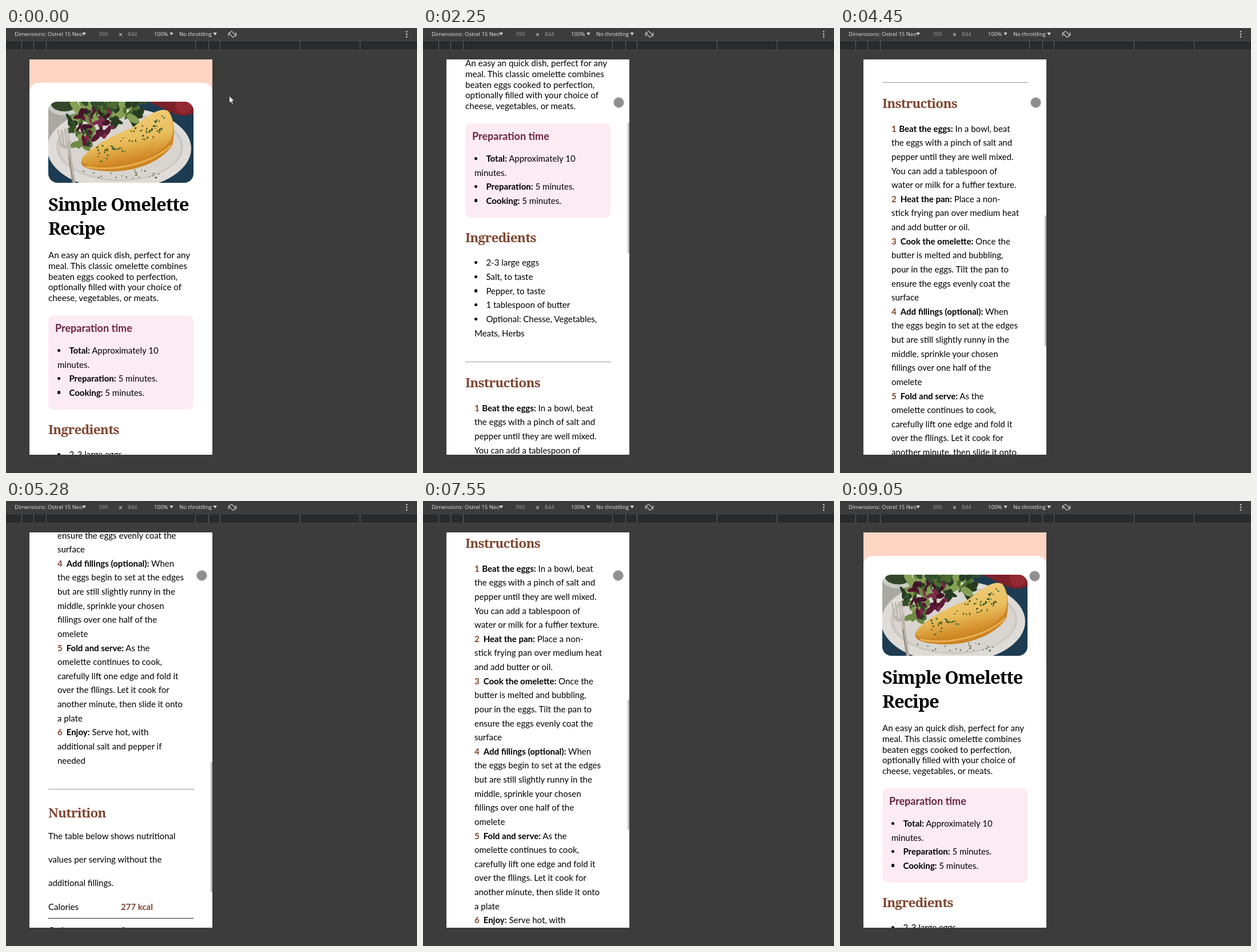
An HTML page for the animation above (9.65 s loop, 719 by 779 pixels).

```html
<!DOCTYPE html>
<html lang="en">
<head>
<meta charset="utf-8">
<title>Recipe page preview</title>
<style>
  html, body { margin: 0; width: 100%; height: 100%; overflow: hidden; background: #3c3c3c; }
  #stage { position: relative; width: 719px; height: 779px; overflow: hidden; background: #3c3c3c; }
  #stage > *, .page > * { position: absolute; margin: 0; padding: 0; white-space: nowrap; }

  .tool { font: 9.6px/14px "Open Sans", "Noto Sans", sans-serif; color: #e6e6e6; top: 4px; }
  .dim { color: #9b9b9b; }
  .ruler { left: 0; top: 22px; width: 719px; height: 15px; background: #292a2b; border: solid #474747; border-width: 1px 0; box-sizing: content-box; }
  .ruler i { position: absolute; top: 0; width: 1px; height: 15px; background: #646464; }

  #view { left: 41px; top: 55px; width: 320px; height: 692px; overflow: hidden; background: #fff; }
  .page { position: absolute; left: 0; top: 0; width: 320px; height: 2088px; background: #ffd5c4;
    font: 15px/24.62px Lato, sans-serif; color: #000; }
  .card { left: 0; top: 41px; width: 320px; height: 2006px; border-radius: 16px; background: #fff; }
  .photo { left: 33px; top: 73.5px; width: 254px; height: 142.5px; border-radius: 16px; overflow: hidden; }
  h1, h2 { left: 33px; font-family: "Noto Serif", serif; font-weight: 600; letter-spacing: -.032em; }
  h1 { top: 232px; font-size: 31px; line-height: 42px; }
  h2 { font-size: 22.5px; line-height: 30px; color: #7f4530; }
  h3 { left: 45px; top: 458px; font-size: 18px; line-height: 24px; color: #6c2447; }
  .intro { left: 33px; top: 332.7px; font-size: 15.2px; line-height: 18.9px; }
  .prep { left: 33px; top: 448px; width: 254px; height: 164.5px; border-radius: 9px; background: #fdebf3; }
  .list { left: 49px; }
  .list u { display: inline-block; width: 5.4px; height: 5.4px; margin-right: 15px; border-radius: 50%; background: #000; vertical-align: 3px; }
  .list s { margin-right: 7px; text-decoration: none; font-weight: 700; color: #7f4530; }
  .list s:first-child { margin-right: 4.5px; }
  .rule { left: 33px; width: 255px; height: 1px; background: #989898; }
  .note { left: 33px; top: 1723.2px; line-height: 41px; }
  .facts { left: 33px; top: 1846.6px; width: 254px; }
  .facts div { height: 40.8px; line-height: 40px; border-bottom: 1px solid #222; }
  .facts b { position: absolute; left: 127px; color: #7f4530; }

  #bar { position: absolute; right: 0; top: 0; width: 3px; height: 228px; background: #bdbdbd; }
  #touch { left: -10px; top: -10px; width: 17px; height: 17px; border: 1.5px solid #c4c4c4; border-radius: 50%; background: #8f8f8f; }
  #arrow { left: 0; top: 0; }
</style>
</head>
<body>
<div id="stage">
  <span class="tool" style="left:15px">Dimensions: Ostrel 15 Neo</span>
  <span class="tool dim" style="left:162px">390</span>
  <span class="tool" style="left:197px;top:5px;font-size:12px">×</span>
  <span class="tool dim" style="left:213px">844</span>
  <span class="tool" style="left:259px">100%</span>
  <span class="tool" style="left:303px">No throttling</span>
  <svg style="left:0;top:0" width="719" height="22" fill="#d8d8d8">
    <path d="M133.500 8h6.500l-3.250 5zM286.500 8h6l-3 5zM362.500 8h6.500l-3.250 5z"/>
    <g transform="rotate(-45 396 11)" fill="none" stroke="#cfcfcf" stroke-width="1.2">
      <rect x="391" y="8" width="10" height="6" rx="1" transform="rotate(90 396 11)"/>
      <path d="M389.500 9a6.800 6.800 0 0 1 5-4.500M402.500 13a6.800 6.800 0 0 1-5 4.500"/>
    </g>
    <circle cx="701" cy="6.500" r="1.300"/><circle cx="701" cy="11" r="1.300"/><circle cx="701" cy="15.500" r="1.300"/>
  </svg>
  <div class="ruler" id="ruler"></div>

  <div id="view">
    <div class="page" id="page">
      <div class="card"></div>
      <div class="photo">
        <svg width="254" height="143" viewBox="0 0 254 143">
          <defs>
            <linearGradient id="egg" x1="0" y1="0" x2=".35" y2="1">
              <stop offset="0" stop-color="#f3d588"/><stop offset=".65" stop-color="#e9bd5c"/><stop offset="1" stop-color="#cf8420"/>
            </linearGradient>
          </defs>
          <rect width="254" height="143" fill="#1d3c52"/>
          <path d="M0 0h75L0 85z" fill="#a9a8a3"/>
          <ellipse cx="28" cy="7" rx="29" ry="17" fill="#c9cbc4"/>
          <ellipse cx="28" cy="4" rx="23" ry="13" fill="#33462a"/>
          <path d="M175 0h79v20q-20 10-42-3z" fill="#7d2029"/>
          <circle cx="237" cy="6" r="15" fill="#932932"/>
          <ellipse cx="124" cy="82" rx="126" ry="72" fill="#dfdcd8"/>
          <ellipse cx="125" cy="79" rx="111" ry="60" fill="#cbc7c2"/>
          <ellipse cx="126" cy="80" rx="106" ry="56" fill="#d8d4cf"/>
          <g id="salad"></g>
          <path d="M58 104C64 86 110 60 148 46C172 26 198 8 211 17C222 33 221 60 217 76C198 106 150 123 108 122C82 121 54 117 58 104z" fill="#cc8424"/>
          <path d="M58 102C64 85 110 59 148 45C172 25 198 7 210 17C221 32 220 56 214 67C196 94 150 109 108 111C84 113 60 114 58 102z" fill="url(#egg)"/>
          <path d="M66 113C105 124 180 111 215 76" fill="none" stroke="#e9b04c" stroke-width="3"/>
          <g id="herbs"></g>
          <g fill="none" stroke="#bcb5ac" stroke-linecap="round">
            <path d="M17 50l5 26M23 49l4 26M29 48l3 26M34 48l2 26" stroke-width="2.500"/>
            <path d="M23 75q7 9 13 0q1 14 2 24l7 44" stroke-width="6"/>
            <path d="M36 96l7 46" stroke="#8d867e" stroke-width="2"/>
          </g>
        </svg>
      </div>
      <h1>Simple Omelette<br>Recipe</h1>
      <p class="intro">An easy an quick dish, perfect for any<br>meal. This classic omelette combines<br>beaten eggs cooked to perfection,<br>optionally filled with your choice of<br>cheese, vegetables, or meats.</p>

      <div class="prep"></div>
      <h3>Preparation time</h3>
      <p class="list" style="top:497px"><u></u><b>Total:</b> Approximately 10<br>minutes.<br><u></u><b>Preparation:</b> 5 minutes.<br><u></u><b>Cooking:</b> 5 minutes.</p>

      <h2 style="top:632.8px">Ingredients</h2>
      <p class="list" style="top:679.4px"><u></u>2-3 large eggs<br><u></u>Salt, to taste<br><u></u>Pepper, to taste<br><u></u>1 tablespoon of butter<br><u></u>Optional: Chesse, Vegetables,<br>Meats, Herbs</p>
      <div class="rule" style="top:865px"></div>

      <h2 style="top:886.8px">Instructions</h2>
      <p class="list" style="top:933.7px"><s>1</s><b>Beat the eggs:</b> In a bowl, beat<br>the eggs with a pinch of salt and<br>pepper until they are well mixed.<br>You can add a tablespoon of<br>water or milk for a fuffier texture.<br>
<s>2</s><b>Heat the pan:</b> Place a non-<br>stick frying pan over medium heat<br>and add butter or oil.<br>
<s>3</s><b>Cook the omelette:</b> Once the<br>butter is melted and bubbling,<br>pour in the eggs. Tilt the pan to<br>ensure the eggs evenly coat the<br>surface<br>
<s>4</s><b>Add fillings (optional):</b> When<br>the eggs begin to set at the edges<br>but are still slightly runny in the<br>middle, sprinkle your chosen<br>fillings over one half of the<br>omelete<br>
<s>5</s><b>Fold and serve:</b> As the<br>omelette continues to cook,<br>carefully lift one edge and fold it<br>over the fllings. Let it cook for<br>another minute, then slide it onto<br>a plate<br>
<s>6</s><b>Enjoy:</b> Serve hot, with<br>additional salt and pepper if<br>needed</p>
      <div class="rule" style="top:1661px"></div>

      <h2 style="top:1687.8px">Nutrition</h2>
      <p class="note">The table below shows nutritional<br>values per serving without the<br>additional fillings.</p>
      <div class="facts">
        <div>Calories<b>277 kcal</b></div>
        <div>Carbs<b>0 g</b></div>
        <div>Protein<b>20 g</b></div>
        <div>Fat<b>22 g</b></div>
      </div>
    </div>
    <div id="bar"></div>
  </div>

  <div id="touch"></div>
  <svg id="arrow" width="12" height="18"><path d="M.500 .500v13l3-2.700 2 4.500 2-.900-2-4.300h3.800z" fill="#fff" stroke="#111" stroke-width=".8"/></svg>
</div>

<script>
const LOOP = 9650, STEP = 70, TRACK = 692 / 2088;
const el = id => document.getElementById(id);

// Periods of motion: the picture is held for one step at a time.
const bursts = [[70, 390], [590, 1320], [1650, 2460], [2660, 3160], [3360, 3500], [3760, 4180],
  [4450, 4800], [5000, 5350], [5550, 5900], [6510, 7400], [7550, 7760], [7960, 8510]];

// [time, value] points, eased in between
const scroll = [[520, 0], [955, 82], [1320, 164], [1580, 164], [1900, 246], [2180, 328], [2250, 336],
  [2460, 410], [2590, 410], [2870, 492], [3160, 574], [3290, 574], [3360, 593], [3500, 656],
  [3690, 656], [4180, 820], [4380, 820], [4450, 825], [4800, 984], [4930, 984], [5350, 1230],
  [5480, 1230], [5900, 1396], [6570, 1396], [6985, 1150], [7400, 904], [7480, 904], [7550, 883],
  [7760, 740], [7890, 740], [8510, 0]];
const cursorX = [[0, 390], [390, 321], [520, 321], [1320, 343], [6570, 343], [7400, 342], [7890, 342], [8510, 341]];
const cursorY = [[0, 118], [520, 118], [1320, 131], [7890, 131], [8510, 132]];
const barFade = [[0, 0], [590, 1], [6230, .6], [6370, .25], [6510, 0], [6640, 1], [8910, .5], [9050, .12]];

function held(t) {
  const b = bursts.find(([from, to]) => t >= from && t < to);
  return b ? Math.max(b[0], b[1] - Math.ceil((b[1] - t) / STEP) * STEP) : t;
}

function ease(points, t) {
  const i = points.findIndex(p => p[0] > t);
  if (i === 0) return points[0][1];
  if (i < 0) return points[points.length - 1][1];
  const [t0, a] = points[i - 1], [t1, b] = points[i];
  const u = (t - t0) / (t1 - t0);
  return a + (b - a) * u * u * (3 - 2 * u);
}

const latest = (points, t) => points.filter(p => p[0] <= t).pop()[1];

function draw() {
  const now = performance.now() % LOOP, t = held(now);
  const y = Math.round(ease(scroll, t));
  el("page").style.transform = `translateY(${-y}px)`;
  el("bar").style.transform = `translateY(${y * TRACK}px)`;
  el("bar").style.opacity = latest(barFade, now);
  const x = ease(cursorX, t), inside = x < 361;
  const at = `translate(${x}px, ${ease(cursorY, t)}px)`;
  for (const [id, on] of [["touch", inside], ["arrow", !inside]]) {
    el(id).style.transform = at;
    el(id).style.visibility = on ? "visible" : "hidden";
  }
  requestAnimationFrame(draw);
}

let seed = 7;
const rnd = (lo, hi) => {
  seed = (seed * 16807) % 2147483647;
  return lo + (hi - lo) * seed / 2147483647;
};

function leaf(x, y, rx, ry, colors) {
  const fill = colors[Math.floor(rnd(0, colors.length))];
  return `<ellipse rx="${rx}" ry="${ry}" fill="${fill}" transform="translate(${x} ${y}) rotate(${rnd(0, 180)})"/>`;
}

function garnish() {
  const greens = ["#34502a", "#4c6b31", "#6d8a43", "#263c22", "#85a055"];
  const reds = ["#5a1a35", "#7c2a4b", "#431529"];
  let salad = "", herbs = "";
  for (let i = 0; i < 75; i++) salad += leaf(rnd(38, 165), rnd(-2, 38), rnd(6, 14), rnd(3, 7), greens);
  for (let i = 0; i < 30; i++) salad += leaf(rnd(36, 78), rnd(38, 80), rnd(5, 10), rnd(3, 6), greens);
  for (let i = 0; i < 32; i++) salad += leaf(rnd(52, 110), rnd(14, 70), rnd(5, 11), rnd(2, 5), reds);
  for (let i = 0; i < 60; i++) {
    const u = rnd(0, 1);
    herbs += leaf(85 + u * 120, 93 - u * 58 + rnd(-14, 18), rnd(1, 3), rnd(.8, 1.6), greens.slice(0, 2));
  }
  for (let i = 0; i < 24; i++) herbs += leaf(rnd(60, 215), rnd(120, 134), rnd(.8, 2), .9, greens.slice(0, 2));
  el("salad").innerHTML = salad;
  el("herbs").innerHTML = herbs;
}

el("ruler").innerHTML = [27, 48, 70, 331, 354, 374, 514, 619].map(x => `<i style="left:${x}px"></i>`).join("");
garnish();
draw();
</script>
</body>
</html>
```
